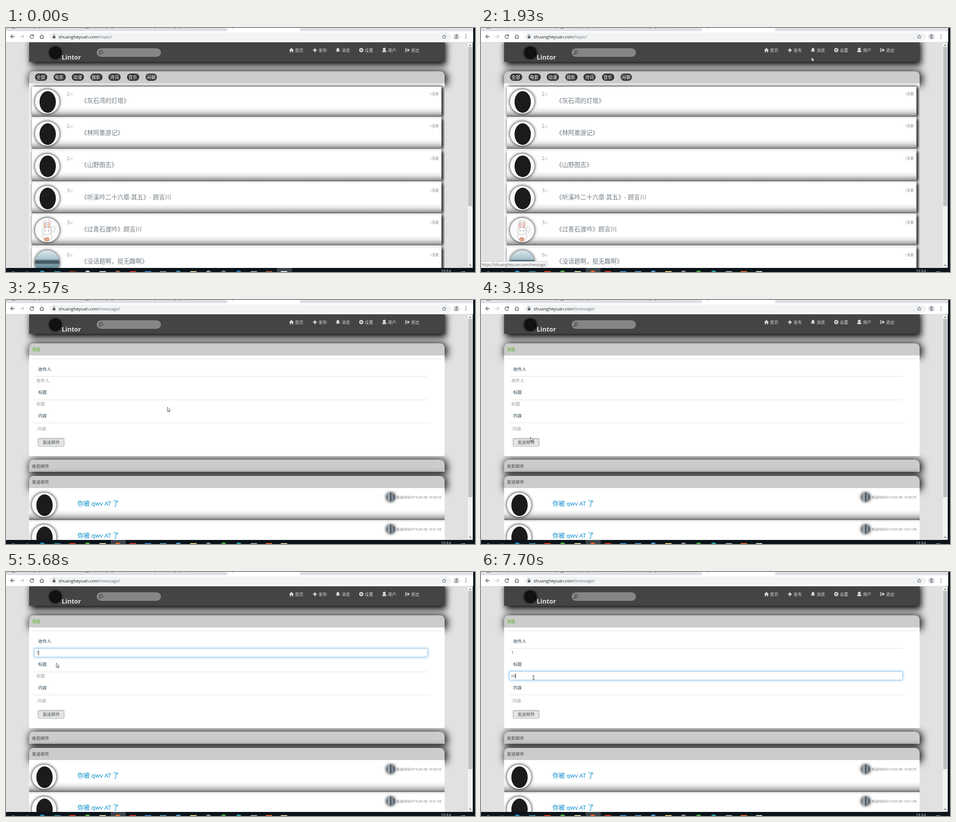
An HTML page that plays this animation: 1035x541 px, repeating every 8000 ms.

```html
<!DOCTYPE html>
<html lang="zh">
<head>
<meta charset="utf-8">
<title>消息</title>
<style>
html, body { margin: 0; width: 100%; height: 100%; overflow: hidden; }
#stage { position: relative; width: 1035px; height: 541px; overflow: hidden; background: #0c151c;
  font-family: "Open Sans", "Noto Sans CJK SC", "Noto Sans CJK", sans-serif; }
#stage div, svg { position: absolute; }
svg { left: 0; top: 0; width: 1035px; height: 541px; overflow: hidden; }
text { white-space: pre; }
.layer { left: 0; top: 0; width: 1035px; height: 541px; }
.view { clip-path: inset(31px 16px 9px 0); background: #e1e1e1; }
.header { background: #444; box-shadow: 3px 7px 14px #000; }
.bar { background: #ccc; border-radius: 10px 10px 0 0; box-shadow: 3px 2px 17px 2px #000; }
.panel { background: #fff; overflow: hidden; }
.row { background: linear-gradient(#fff 68%, #e9e9e9 80%, #bcbcbc 90%, #8e8e8e 97%, #7c7c7c);
  box-shadow: 0 0 7px rgba(0,0,0,.55), 5px 0 7px rgba(0,0,0,.8); }
.row::after { content: ""; position: absolute; z-index: 1; left: 0; right: 0; top: 100%; height: 4.3px; background: #f0f0f0; }
.face { border-radius: 50%; background: #fafafa; box-shadow: 0 0 7px #000; overflow: hidden; }
.lake { background: linear-gradient(#d4e2e8 5%, #a9c4cf 36%, #4a5d66 43%, #3f545d 52%, #7d9eab 58%, #3d6677); }
.street { background: linear-gradient(90deg, #59626b, #b4bdc5 35%, #3c434b 45%, #8995a0 65%, #46505a); }
.pill { background: #333; border-radius: 9px; }
.search { background: #878484; border-radius: 10px; }
.logo { background: #111; border-radius: 50%; box-shadow: 0 0 5px #111; }
.line { background: #e1e1e1; }
.field { box-sizing: border-box; background: #fff; border: 1px solid #8fc6ef; border-radius: 3px;
  box-shadow: 0 0 6px rgba(82,168,236,.6); opacity: 0; }
.to { animation: glow-to 8s linear infinite; }
.subject { animation: glow-subject 8s linear infinite; }
@keyframes glow-to { 0%, 57.5% { opacity: 0 } 59.25%, 74.25% { opacity: 1 } 76.75%, 100% { opacity: 0 } }
@keyframes glow-subject { 0%, 74.25% { opacity: 0 } 76.75%, 100% { opacity: 1 } }
.button { box-sizing: border-box; background: #e6e6e6; border: 1px solid #b5b5b5; border-radius: 3px;
  box-shadow: inset 0 1px 3px rgba(0,0,0,.2); }
.status { box-sizing: border-box; background: #f3f4f5; border: solid #c5c7ca; border-width: 1px 1px 0 0; border-radius: 0 3px 0 0; }
#pointer { left: 0; top: 0; width: 0; height: 0; animation: move 8s linear infinite; }
#pointer svg { width: 16px; height: 20px; overflow: visible; }
</style>
</head>
<body>
<div id="stage"></div>
<script>
const LOOP = 8000, PITCH = 71.35, GO = 2020;
const HOST = 'shuangheyuan.com';
const TOPIC = `0-${GO}`, MESSAGE = `${GO}-8000`;

const show = when => when ? ` data-show="${when}"` : '';
const box = (x, y, w, h, cls, inner = '', when) =>
  `<div class="${cls}"${show(when)} style="left:${x}px;top:${y}px;width:${w}px;height:${h}px">${inner}</div>`;
const text = (x, y, size, fill, str, extra = '') =>
  `<text x="${x}" y="${y}" font-size="${size}" fill="${fill}" ${extra}>${str}</text>`;
const path = (d, fill, extra = '') => `<path d="${d}" fill="${fill}" ${extra}/>`;
const stroke = (d, color, width = 1.3) => path(d, 'none', `stroke="${color}" stroke-width="${width}"`);
const rect = (x, y, w, h, fill, extra = '') =>
  `<rect x="${x}" y="${y}" width="${w}" height="${h}" fill="${fill}" ${extra}/>`;
const dot = (x, y, r, fill, extra = '') => `<circle cx="${x}" cy="${y}" r="${r}" fill="${fill}" ${extra}/>`;
const oval = (x, y, rx, ry, fill, extra = '') =>
  `<ellipse cx="${x}" cy="${y}" rx="${rx}" ry="${ry}" fill="${fill}" ${extra}/>`;
const svg = inner => `<svg>${inner}</svg>`;
const layer = (cls, inner, when) => `<div class="layer ${cls}"${show(when)}>${inner}</div>`;
const end = 'text-anchor="end"';

const blob = (x, y) => oval(x + 1, y + 1, 18, 24, '#1c1a1a');
const rabbit = (x, y) => {
  const edge = 'stroke="#999" stroke-width=".7"';
  return [-5, 4].map(d => oval(x + d, y - 12, 3.5, 11, '#fff', edge) + oval(x + d, y - 11, 1.5, 8, '#e5a48d')).join('') +
    oval(x, y + 14, 10, 11, '#fff', edge) + oval(x - 1, y + 20, 6, 5, '#dfa28c') +
    oval(x - 1, y + 2, 10, 8, '#fff', edge) + dot(x - 5, y + 1, 1, '#333') + dot(x + 3, y + 1, 1, '#333') +
    oval(x + 13, y - 2, 4, 6, '#fff', edge);
};

const navItems = [
  ['首页', 625, 'M0 5 5 0 10 5 9 6 8.5 5.5V10H6V7H4V10H1.5V5.5L1 6Z'],
  ['发布', 677, 'M3.5 1H6V4H9V6.5H6V9.5H3.5V6.5H.5V4H3.5Z', '1290-1500'],
  ['消息', 728, 'M4.5 0Q7.5 .5 7.5 4 7.5 6.5 9 8H0Q1.5 6.5 1.5 4 1.5 .5 4.5 0M3.3 8.6H5.7L4.5 10Z', '1520-1930'],
  ['设置', 779, 'M4 0H6L6.3 1.4 7.8.8 9.2 2.2 8.6 3.7 10 4V6L8.6 6.3 9.2 7.8 7.8 9.2 6.3 8.6 6 10H4L3.7 8.6 2.2 9.2.8 7.8 1.4 6.3 0 6V4L1.4 3.7.8 2.2 2.2.8 3.7 1.4ZM5 3.3A1.7 1.7 0 1 0 5 6.7 1.7 1.7 0 1 0 5 3.3'],
  ['用户', 830, 'M4.8 0A2.4 2.7 0 0 1 6.3 5.2L9.3 7V9.5H.3V7L3.3 5.2A2.4 2.7 0 0 1 4.8 0'],
  ['退出', 881, 'M4 1H1.5Q0 1 0 2.5V7.5Q0 9 1.5 9H4V7.7H1.5V2.3H4ZM6 1.5 10 5 6 8.5V6.2H3V3.8H6Z', '900-1140'],
];
const navLook = (item, color, when) =>
  `<g${show(when)}>` + path(item[2], color, `transform="translate(${item[1]} 44)" fill-rule="evenodd"`) +
  text(item[1] + 12.8, 53, 9.1, color, item[0]) + '</g>';

const header = box(51, 22, 917, 53, 'header') + box(95, 41, 28, 28, 'logo') + box(200, 45, 142, 19, 'search') +
  svg(text(123, 70, 14, '#ddd', 'Lintor', 'font-weight="700"') +
    dot(210, 53.5, 3.3, 'none', 'stroke="#444" stroke-width="1.5"') + stroke('M207.8 56 204.8 59.5', '#444', 1.8) +
    navItems.map(i => navLook(i, '#d8d8d8') + (i[3] ? navLook(i, '#fff', i[3]) : '')).join(''));

const topics = [
  ['2', '5', '《灰石湾的灯塔》'], ['2', '4', '《林阿墨游记》'], ['2', '5', '《山野图志》'],
  ['3', '5', '《听溪吟二十六章·其五》- 顾言川'], ['3', '6', '《过青石渡吟》顾言川'], ['0', '0', '《没话题啊，挺无趣啊》'],
];
const tags = ['全部', '电影', '动漫', '摄影', '诗词', '音乐', '闲聊'];
const tagX = i => 64 + i * 40.6;

const topicPage = layer('view', box(51, 96, 917, 27, 'bar') + header +
  tags.map((_, i) => box(tagX(i), 101, i < 6 ? 27 : 25, 16, 'pill')).join('') +
  box(51, 123, 917, 409, 'panel', topics.map((_, i) => {
    const y = 7 + i * PITCH;
    return box(6, y, 904, 67, 'row') + box(13, y + 6, 54, 54, 'face' + (i > 4 ? ' lake' : ''));
  }).join('')) +
  svg(tags.map((t, i) => text(tagX(i) + 3, 113, 9.8, '#fff', t)).join('') +
    topics.map(([n, total, title], i) => {
      const y = i * PITCH;
      return (i < 4 ? blob(91, 163 + y) : i < 5 ? rabbit(91, 163 + y) : '') +
        text(134.5, 150 + y, 10, '#858585', n) + text(140.5, 150 + y, 7, '#aaa', '/' + total) +
        text(165.5, 165.5 + y, 13.4, '#737b82', title) +
        text(955, 149 + y, 7.5, '#777', '1天前', end);
    }).join('')), TOPIC);

const INK = '#2e4754', HINT = '#999';
const mails = ['15:40:55', '15:41:58'];
const caret = (x, y, when) => rect(x, y, 1, 11, '#222', show(when));

const messagePage = layer('view',
  [96, 354, 390].map(y => box(51, y, 917, 27, 'bar')).join('') + header +
  box(51, 123, 917, 223, 'panel') +
  box(51, 417, 917, 115, 'panel', mails.map((_, i) => {
    const y = i * PITCH;
    return box(0, y + (i ? 4 : 0), 917, i ? 67 : 71, 'row') + box(6, y + 10, 54, 54, 'face') +
      box(788, y + 10, 20, 20, 'face street');
  }).join('')) +
  box(57, 130, 904, 1, 'line') + box(62, 169, 867, 1, 'line') + box(62, 221, 868, 1, 'line') + box(62, 272, 874, 1, 'line') +
  box(62, 169, 869, 20, 'field to') + box(62, 220, 869, 20, 'field subject') +
  box(70, 306, 59, 19, 'button') +
  svg(text(57, 112.5, 9.6, '#57b522', '消息') +
    ['收件人', '标题', '内容'].map((s, i) => text(71, 157 + i * 51.4, 9.6, INK, s)).join('') +
    text(67, 182, 9.6, HINT, '收件人', show('0-5360')) + text(67, 233.5, 9.6, HINT, '标题', show('0-7550')) +
    text(69.5, 288.5, 9.6, HINT, '内容') + text(80.5, 319, 9.6, '#444f55', '发送邮件') +
    text(67, 182, 9, '#555', '1', show('5360-8000')) +
    text(67, 233.5, 9, '#555', 'H', show('7550-7700')) + text(67, 233.5, 9, '#555', 'HI', show('7700-8000')) +
    caret(67, 174, '4620-5150') + caret(71.5, 174, '5360-5890') +
    caret(67, 225, '5940-6470 7000-7530') + caret(73.5, 225, '7550-7700') + caret(76, 225, '7700-8000') +
    text(57, 371.5, 9.6, '#444', '收到邮件') + text(57, 407, 9.6, '#444', '发送邮件') +
    mails.map((time, i) => {
      const y = i * PITCH;
      return blob(84, 454 + y) + text(158, 456 + y, 13.4, '#08c', '你被 qwv AT 了') +
        text(961, 440 + y, 7.4, '#777', '发送时间2019-09-08 ' + time, end);
    }).join('')), MESSAGE);

const status = (w, where, when) =>
  box(0, 517, w, 15, 'status', '', when) + svg(text(1, 528, 8.3, '#5f6368', `https://${HOST}/${where}`, show(when)));

const address = (where, when) => text(116, 22.7, 9.7, '#202124',
  `${HOST}<tspan fill="#6b6f73">/${where}/</tspan>`, show(when));

const browser = svg(
  rect(0, 0, 1031, 8, '#dee1e6') + path('M485 8Q488 8 488 5V0H649V5Q649 8 652 8Z', '#fff') + rect(0, 7, 1031, 24, '#fff') +
  rect(0, 31, 1031, .7, '#ddd') +
  [26, 187, 337].map(x => text(x, -1, 9, '#5f6368', 'topic page gallery')).join('') +
  [12, 175].map(x => rect(x, 0, 8, 1, '#555')).join('') + [166, 328].map(x => rect(x, 0, 1, 3, '#999')).join('') +
  dot(501, -3, 4, '#aaa') +
  rect(95, 10, 888, 18, '#f1f3f4', 'rx="9"') +
  stroke('M19 19H10.5M14.5 15 10.5 19 14.5 23', '#55595d') + stroke('M31 19H39.5M35.5 15 39.5 19 35.5 23', '#c5c7ca') +
  stroke('M60.5 17A4 4 0 1 0 61 20.5', '#55595d') + path('M61.7 14.2V18.3H57.6Z', '#55595d') +
  stroke('M74.5 19 79 15 83.5 19M76 18V23H82V18', '#55595d') +
  rect(103, 18, 6, 5, '#5f6368', 'rx=".7"') + stroke('M104.2 18V16.5A1.8 1.8 0 0 1 107.8 16.5V18', '#5f6368', 1) +
  stroke('M967 14.8 968.3 17.8 971.4 18 969 20.2 969.8 23.3 967 21.6 964.2 23.3 965 20.2 962.6 18 965.7 17.8Z', '#5f6368', 1) +
  dot(994, 19, 7, '#d5d8dc') + dot(994, 17, 2.2, '#777c82') + path('M990 23Q994 18.5 998 23Z', '#777c82') +
  [15, 19, 23].map(y => dot(1015, y, 1, '#55595d')).join('') +
  address('topic', TOPIC) + address('message', MESSAGE) +
  rect(1019, 31.7, 11, 500, '#f1f1f1') +
  rect(1020, 42, 9, 353, '#c1c1c1', show(TOPIC)) + rect(1020, 42, 9, 395, '#c1c1c1', show(MESSAGE)) +
  path('M1022 39.5H1027L1024.5 36.5ZM1022 525H1027L1024.5 528Z', '#666'));

// Taskbar tops: a leading "o" marks a circle, otherwise a square.
const apps = (colors, active, when) => `<g${show(when)}>` + rect(active, 532, 33, 9, '#3c4449') +
  colors.split(' ').map((c, i) => {
    const x = 80 + i * 33.35, round = c[0] === 'o', fill = '#' + c.replace('o', '');
    return round ? dot(x, 544, 6.5, fill) : rect(x - 7, 539, 14, 3, fill);
  }).join('') + '</g>';
const taskbar = svg(rect(0, 532, 1035, 9, '#0b141a') + dot(16, 544, 4, '#ddd') + dot(47, 544, 4, '#999') +
  apps('o2d8fc0 2e7f93 8f2a22 oc9c9c9 d8d8d8 o8a5a44 d83a32 3a86c8 7d8a92 o3f86ad dcc9a0 o9c9c9c o8a7a70 o2f7fc4 a5a5a5 a5583a e8e8e8', 598, '0-1860') +
  apps('o2d8fc0 2e7f93 e23b22 o58b447 d8d8a8 oe2672c d83a32 3a86c8 4c90b8 o4a9fd0 e8cf86 o93829f o4fae4b o2aa5a0 a5a5a5 ee6a2c d8cdb0', 231, '1860-8000') +
  text(960, 542.5, 8.6, '#fff', '15:54') + rect(1004, 540, 10, 1, '#bbb'));

const outline = 'stroke="#222" stroke-width=".8" stroke-linejoin="round"';
const kind = (inner, when) => `<svg${show(when)}>${inner}</svg>`;
const pointer = '<div id="pointer">' +
  kind(path('M0 0V9.5L2.2 7.5 3.7 10.9 5.3 10.2 3.8 6.8H6.8Z', '#fff', outline), '210-900 1900-4420 5530-5830 6220-6480') +
  kind(path('M-1 1Q0-.6 1 1V5L4.4 5.8Q5.5 6.2 5.2 8L4.2 12H-.4L-3 8.2Q-2.8 6.6-1 8Z', '#fff', outline), '900-1900') +
  kind(stroke('M-2.5-4H-.5L0-3.5.5-4H2.5M0-3.5V3.5M-2.5 4H-.5L0 3.5.5 4H2.5', '#333', 1), '4420-5360 5830-6220 6480-8000') +
  '</div>';

// time, x, y of the pointer's hot spot
const route = [
  [0, 629, 454], [210, 629, 454], [450, 690, 390], [700, 830, 190], [880, 890, 58], [990, 893, 50], [1140, 860, 52],
  [1370, 711, 54], [1480, 716, 53], [1600, 735, 50], [1860, 735, 51], [1960, 727, 70], [2120, 727, 70], [2500, 420, 220],
  [2800, 150, 295], [2950, 110, 303], [3240, 109, 304], [3400, 115, 240], [3580, 126, 143], [3730, 129, 145],
  [4040, 127, 157], [4350, 127, 163], [4590, 125, 179], [5360, 125, 179], [5530, 115, 190], [5680, 111, 202],
  [5800, 112, 220], [5940, 113, 231], [6320, 116, 242], [6390, 116, 242], [6770, 116, 234], [8000, 116, 234],
];

const percent = t => t / LOOP * 100 + '%';
const stage = document.getElementById('stage');
stage.innerHTML = topicPage + messagePage + browser +
  status(152, 'topic/new', '1290-1520') + status(146, 'message', '1520-2230') + taskbar + pointer;

let css = '@keyframes move {' +
  route.map(([t, x, y]) => `${percent(t)}{transform:translate(${x}px,${y}px)}`).join('') + '}';
for (const when of new Set([...stage.querySelectorAll('[data-show]')].map(el => el.dataset.show))) {
  const name = 'show-' + when.replace(/ /g, '-');
  const spans = when.split(' ').map(s => s.split('-'));
  css += `@keyframes ${name}{0%{opacity:0}` +
    spans.map(([a, b]) => `${percent(a)}{opacity:1}` + (b < LOOP ? `${percent(b)}{opacity:0}` : '')).join('') +
    `100%{opacity:${spans.at(-1)[1] < LOOP ? 0 : 1}}}` +
    `[data-show="${when}"]{animation:${name} ${LOOP}ms step-end infinite}`;
}
document.head.append(Object.assign(document.createElement('style'), { textContent: css }));
</script>
</body>
</html>
```
